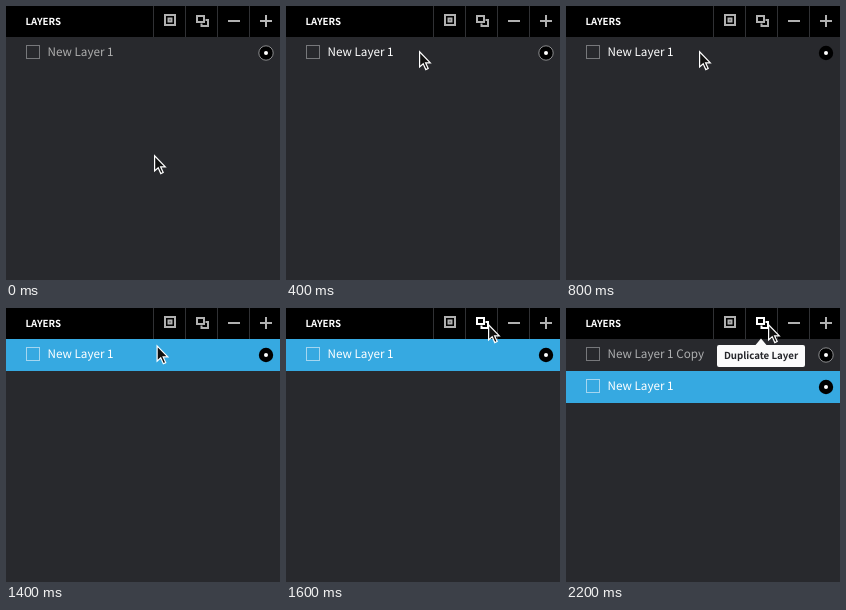
An HTML page that plays this animation: 274x274 px, repeating every 3.3 s.

```html
<!DOCTYPE html>
<html lang="en">
<head>
<meta charset="utf-8">
<title>Layers panel</title>
<style>
html, body { margin: 0; height: 100%; overflow: hidden; background: #28292d; }
svg { display: block; width: 100vw; height: 100vh; }
text { font: 11.7px "Noto Sans CJK SC", "Noto Sans CJK JP", "Noto Sans", sans-serif; text-rendering: geometricPrecision; }
.bold { font-size: 9.7px; font-weight: 600; }
.icon { fill: none; stroke: #b0b0b0; stroke-width: 2; }
.row text { fill: #aeafb0; }
.row .back { fill: none; }
.box { fill: none; stroke: #77787b; }
.eye { stroke: #8b8c8e; }
.flat .eye { stroke: none; }
.row.on .back { fill: #36a9e1; }
.row.on text { fill: #fff; }
.row.on .box { stroke: #a4d6f0; }
</style>
</head>
<body>
<svg viewBox="0 0 274 274">
  <defs>
    <g id="eye"><circle cx="260" cy="16" r="7.2"/><circle cx="260" cy="16" r="2" fill="#fff" stroke="none"/></g>
  </defs>
  <rect width="274" height="274" fill="#28292d"/>
  <rect width="274" height="31"/>
  <path d="M147.5 0V31M179.5 0V31M211.5 0V31M243.5 0V31" stroke="#303134"/>
  <text class="bold" x="19.4" y="19" fill="#fff">LAYERS</text>
  <path class="icon" d="M159 9H169V19H159ZM162.5 12.5H165.5V15.5H162.5Z"/>
  <path class="icon" id="copyIcon" d="M191 10H198V16H191ZM199.5 14H202V20H195.5V17.5"/>
  <path class="icon" d="M222 15H234"/>
  <path class="icon" id="plus" d="M254 15H266M260 9V21"/>

  <g class="row" id="copy" transform="translate(0 31)">
    <rect class="box" x="20.5" y="8.5" width="13" height="13"/>
    <text x="41.5" y="19">New Layer 1 Copy</text>
    <use class="eye" href="#eye"/>
  </g>
  <g class="row" id="layer">
    <rect class="back" width="274" height="32"/>
    <rect class="box" x="20.5" y="8.5" width="13" height="13"/>
    <text id="label" x="41.5" y="19">New Layer 1</text>
    <use class="eye" href="#eye"/>
  </g>

  <g id="tip">
    <path d="M189.5 37L195 30.5L200.5 37H237Q239 37 239 39V57Q239 59 237 59H153Q151 59 151 57V39Q151 37 153 37Z" fill="#fbfbfb"/>
    <text class="bold" x="195" y="51" text-anchor="middle" fill="#25262a">Duplicate Layer</text>
  </g>
  <path id="cursor" d="M.6 .8V16L4.2 12.7L6.8 18.6L9.2 17.5L6.6 11.8H11.3Z" fill="#111" stroke="#fff" stroke-width="1.2"/>
</svg>
<script>
const LOOP = 3300, STEP = 100;
const el = id => document.getElementById(id);
const clamp = v => Math.max(0, Math.min(1, v));
const ease = v => v * v * (3 - 2 * v);
const mix = (a, b, k) => a + (b - a) * k;
const gray = v => `rgb(${v},${v},${v})`;

function cursorAt(t) {
  if (t < 1200) {
    const k = ease(clamp(t / 400));
    return [mix(148, 133, k), mix(149, 45, k)];
  }
  const k = ease(clamp((t - 1300) / 300));
  return [mix(132.5, 202, k), mix(44.5, 16, k)];
}

function draw(now) {
  const t = Math.floor(now % LOOP / STEP) * STEP;
  const [x, y] = cursorAt(t);
  const copied = t >= 2100;
  el('cursor').setAttribute('transform', `translate(${x} ${y})`);
  el('plus').style.stroke = gray(mix(184, 176, clamp(t / 300)));
  el('copyIcon').style.stroke = gray(mix(176, 255, clamp((t - 1400) / 200)));
  el('label').style.fill = gray(mix(174, 255, clamp((t - 200) / 200)));
  el('layer').setAttribute('transform', `translate(0 ${copied ? 63 : 31})`);
  el('layer').classList.toggle('flat', t >= 800);
  el('layer').classList.toggle('on', t >= 900);
  el('copy').style.display = copied ? '' : 'none';
  el('tip').style.opacity = copied ? (t < 2200 ? 0.7 : 1) : 0;
}

const start = performance.now();
function loop() {
  draw(performance.now() - start);
  requestAnimationFrame(loop);
}
loop();
</script>
</body>
</html>
```
